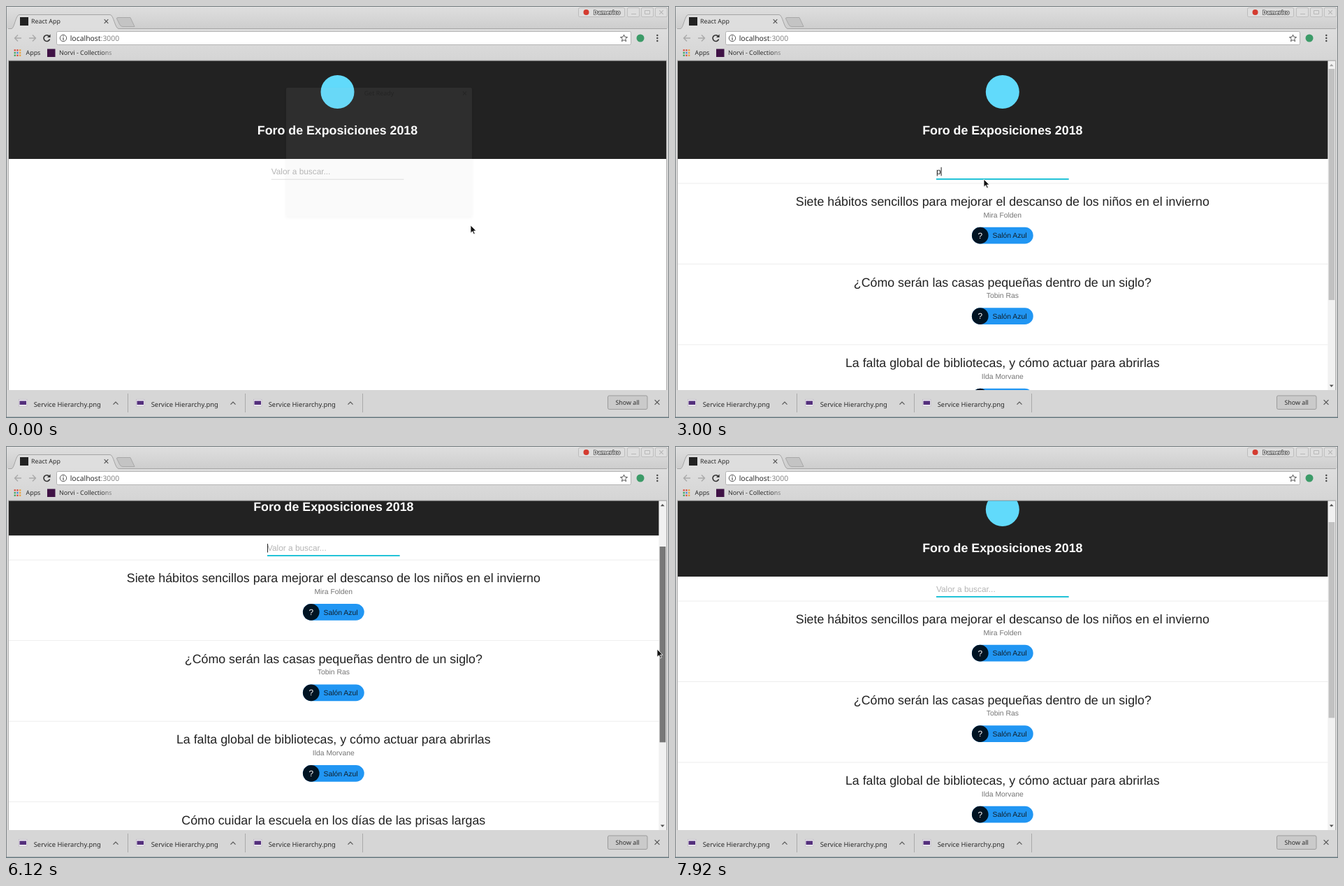
An HTML page for the animation above (8000 ms loop, 949 by 590 pixels).

```html
<!DOCTYPE html>
<html lang="es">
<head>
<meta charset="utf-8">
<title>React App</title>
<style>
  html, body { margin: 0; width: 100%; height: 100%; overflow: hidden; }
  svg { display: block; text-rendering: geometricPrecision; }
  text { font-family: "Noto Sans", sans-serif; font-size: 8.9px; fill: #2c2c2c; }
  .page text { font-family: "Liberation Sans", Arial, sans-serif; font-size: 10.37px; }
  .page .heading { font-size: 17.8px; font-weight: bold; fill: #fff; }
  .page .title { font-size: 17.8px; fill: #212121; }
  .page .author { fill: #757575; }
  .page .field { font-size: 11.85px; }
  .mid { text-anchor: middle; }
  .line { fill: none; stroke: #555; stroke-width: 1.2; }
</style>
</head>
<body>
<svg id="stage" width="949" height="590" viewBox="0 0 949 590"></svg>
<script>
const LOOP = 8000, STEP = 120;
const CENTER = 474.5, ROW_TOP = 254, ROW_HEIGHT = 115.5;
const VIEW_HEIGHT = 471.5, TRACK_TOP = 90, TRACK = 448, DRAG_Y = 237;
const FOCUS_AT = 1320, TYPE_AT = 1960, CLEAR_AT = 3960;

const talks = [
  ["Siete hábitos sencillos para mejorar el descanso de los niños en el invierno", "Mira Folden", "Azul"],
  ["¿Cómo serán las casas pequeñas dentro de un siglo?", "Tobin Ras", "Azul"],
  ["La falta global de bibliotecas, y cómo actuar para abrirlas", "Ilda Morvane", "Azul"],
  ["Cómo cuidar la escuela en los días de las prisas largas", "Florentine Albardoz and Corin Valdersen", "Verde"],
  ["La belleza y la paciencia de los jardines de piedra", "Elsa Trovinger", "Verde"]
];
const rooms = {
  Azul: { fill: "#2196f3", dark: "#001423", width: 87.8 },
  Verde: { fill: "#28a74b", dark: "#001a09", width: 95 }
};

const rect = (x, y, w, h, fill, extra = "") =>
  `<rect x="${x}" y="${y}" width="${w}" height="${h}" fill="${fill}" ${extra}/>`;
const circle = (x, y, r, fill, extra = "") =>
  `<circle cx="${x}" cy="${y}" r="${r}" fill="${fill}" ${extra}/>`;
const path = (d, extra = 'class="line"') => `<path d="${d}" ${extra}/>`;
const text = (x, y, value, extra = "") => `<text x="${x}" y="${y}" ${extra}>${value}</text>`;
const cross = (x, y, r, extra) =>
  path(`M${x - r} ${y - r}l${2 * r} ${2 * r}m0 ${-2 * r}l${-2 * r} ${2 * r}`, extra);

function talkRow([title, author, room], i) {
  const { fill, dark, width } = rooms[room];
  const left = CENTER - width / 2;
  return `<g id="row${i}" transform="translate(0 ${ROW_TOP + i * ROW_HEIGHT})">
    ${rect(0, -.4, 960, .8, "#e9e9e9")}
    ${text(CENTER, 32, title, 'class="title mid"')}
    ${text(CENTER, 48.8, author, 'class="author mid"')}
    ${rect(left, 62.8, width, 23.7, fill, 'rx="11.85"')}
    ${circle(left + 11.85, 74.65, 11.85, dark)}
    ${text(left + 11.85, 78.8, "?", 'class="field mid" style="fill:#fff"')}
    ${text(left + 29.6, 78.4, "Salón " + room, 'style="fill:#10202c"')}
  </g>`;
}

function windowFrame() {
  const buttons = [889.5, 909.5, 929.5].map(x =>
    rect(x, 2.5, 17, 13, "#dedede", 'stroke="#c0c0c0" rx="1.5"')).join("");
  const appColors = ["#dd4b39", "#dd4b39", "#e8a33d", "#3fa65b", "#4285d8", "#e8a33d", "#3fa65b", "#dd4b39", "#e8a33d"];
  const apps = appColors.map((c, i) => rect(11.6 + i % 3 * 3.7, 62.2 + (i / 3 | 0) * 3.7, 2.3, 2.3, c)).join("");
  return `
    ${rect(0, 0, 949, 590, "#d6d6d6")}
    ${rect(0, 0, 949, 32, "url(#bar)")}
    ${rect(0, 0, 949, 1, "#6f787b")}${rect(0, 0, 1, 590, "#7f8588")}
    ${rect(948, 0, 1, 590, "#7f8588")}${rect(0, 588.5, 949, 1.5, "#667980")}
    ${rect(2, 32, 945, 46, "url(#tools)")}
    ${path("M3 32.5H8C12 32 14 12.5 19 12.5H149C154 12.5 156 32 161 32.5H946", 'fill="#dedede" stroke="#a4a4a4"')}
    ${path("M161 16.5H178L184 29.5H167Q164 29.5 162.5 26L158.5 18Q158 16.5 161 16.5Z", 'fill="#c4c4c4" stroke="#a8a8a8"')}
    ${rect(20, 16, 12, 12, "#222")}
    ${text(36, 25.2, "React App")}
    ${cross(143.5, 22, 2.8)}
    ${rect(819.5, 2.5, 66, 13, "#dedede", 'stroke="#bcbcbc" rx="2"')}
    ${circle(830.5, 9, 4, "#d43b30")}
    ${text(841, 12, "Damerico", 'style="font-size:8px;font-weight:600;fill:#eee;stroke:#555;stroke-width:1.6;paint-order:stroke"')}
    ${buttons}
    ${path("M895 11.5H902M914.5 6.5H921.5V11.5H914.5Z", 'fill="none" stroke="#b8b8b8"')}
    ${cross(938, 9, 2.8, 'stroke="#b8b8b8" stroke-width="1.2"')}
    ${path("M22 46H12.5M17 41.5L12.5 46L17 50.5M33 46H42.5M38 41.5L42.5 46L38 50.5", 'fill="none" stroke="#aaa" stroke-width="1.4"')}
    ${path("M62 43.5A4.4 4.4 0 1 0 62.6 47.5", 'fill="none" stroke="#333" stroke-width="1.6"')}
    ${path("M63.6 40.5V45H59Z", 'fill="#333"')}
    ${rect(72.5, 36.5, 822, 19, "#fff", 'stroke="#b3b3b3" rx="2"')}
    ${circle(82, 46, 4.7, "none", 'stroke="#555"')}
    ${path("M82 45V49M82 42.8V44")}
    ${text(91.7, 49.5, 'localhost<tspan fill="#858585">:3000</tspan>', 'style="font-size:10.4px"')}
    ${path("M884.5 41L885.9 44.4L889.5 44.7L886.7 47L887.6 50.6L884.5 48.7L881.4 50.6L882.3 47L879.5 44.7L883.1 44.4Z", 'fill="none" stroke="#555"')}
    ${circle(908, 46, 5.5, "#3c9b68")}
    ${[42, 46, 50].map(y => circle(932.3, y, 1.2, "#444")).join("")}
    ${apps}
    ${text(28.5, 70, "Apps")}
    ${rect(59, 61.5, 11.5, 11.5, "#3f1245")}
    ${text(76, 70, "Norvi - Collections", 'style="fill:url(#fade)"')}
    ${rect(3, 77.5, 943, 472.5, "#b4b4b4")}`;
}

function downloadShelf() {
  const items = [0, 168, 336].map(x => `<g transform="translate(${x} 0)">
    ${rect(18.5, 563.5, 11.5, 9.5, "#f2eef5", 'stroke="#b9b3bf" stroke-width=".6"')}
    ${rect(19.5, 565.5, 9.5, 5.5, "#54307c")}
    ${text(39.7, 573.5, "Service Hierarchy.png", 'style="font-size:9.45px"')}
    ${path("M153.5 570.7L157 567.2L160.5 570.7")}
    ${rect(174, 555, 1, 27, "#aaa")}
  </g>`).join("");
  return `${rect(2, 550, 945, 38, "#d6d6d6")}${items}
    ${rect(861.5, 558, 56.5, 19.5, "#cacaca", 'stroke="#9b9b9b" rx="2"')}
    ${text(889.7, 571, "Show all", 'class="mid"')}
    ${cross(932, 567.5, 3.4)}`;
}

const $ = id => document.getElementById(id);
const set = (id, attrs) => Object.entries(attrs).forEach(([k, v]) => $(id).setAttribute(k, v));
const show = (id, visible) => $(id).setAttribute("visibility", visible ? "visible" : "hidden");

$("stage").innerHTML = `
  <defs>
    <linearGradient id="bar" x2="0" y2="1"><stop stop-color="#dfdfdf"/><stop offset="1" stop-color="#cecece"/></linearGradient>
    <linearGradient id="tools" x2="0" y2="1"><stop stop-color="#dedede"/><stop offset="1" stop-color="#d5d5d5"/></linearGradient>
    <linearGradient id="fade"><stop offset=".8" stop-color="#2c2c2c"/><stop offset="1" stop-color="#2c2c2c" stop-opacity=".4"/></linearGradient>
    <filter id="blur"><feGaussianBlur stdDeviation="2"/></filter>
    <clipPath id="view"><rect x="4" y="78.5" width="941" height="471.5"/></clipPath>
  </defs>
  ${windowFrame()}
  <g class="page" clip-path="url(#view)">
    ${rect(4, 78, 941, 472, "#fff")}
    <g id="content">
      ${rect(0, 78, 960, 141, "#222")}
      ${circle(CENTER, 123, 24, "#61dafb")}
      ${text(CENTER, 183.6, "Foro de Exposiciones 2018", 'class="heading mid"')}
      ${text(379.7, 240.6, "", 'class="field" id="field"')}
      ${rect(379.7, 230.8, 1, 12.5, "#222", 'id="caret"')}
      ${rect(379.7, 247.8, 189.7, .8, "#d8d8d8")}
      ${rect(379.7, 247, 189.7, 1.7, "#00bcd4", 'id="underline"')}
      ${talks.map(talkRow).join("")}
    </g>
    <g id="scrollbar">
      ${rect(934.4, 78, 10.6, 472, "#f1f1f1")}
      ${path("M936.8 86.2L939.7 83L942.6 86.2Z", 'id="arrowUp"')}
      ${path("M936.8 542.6L939.7 545.8L942.6 542.6Z", 'id="arrowDown"')}
      ${rect(935.6, TRACK_TOP, 8.6, 100, "#c1c1c1", 'id="thumb"')}
    </g>
  </g>
  ${downloadShelf()}
  <g id="dialog">
    ${rect(400, 118, 268, 186, "#000", 'rx="3" opacity=".4" filter="url(#blur)"')}
    ${rect(401, 117, 266, 184, "#c8c8c8", 'rx="2"')}
    ${text(534, 128, "Get Ready", 'class="mid"')}
    ${cross(656.5, 125, 2.5)}
  </g>
  ${path("M0 0V11.2L2.7 8.8L4.6 13L6.3 12.2L4.5 8.1H8Z", 'id="cursor" fill="#111" stroke="#fff" stroke-width=".8"')}`;

// [time, x, y] of the pointer tip; x beyond the stage hides it
const pointer = [
  [0, 665, 314], [360, 665, 314], [840, 450, 247], [960, 442, 248], [4320, 442, 248],
  [4920, 852, 249], [5040, 960, 245], [5280, 960, 240], [5520, 936, 237], [5880, 932, 237],
  [6240, 932, 318], [6480, 932, 378], [6720, 932, 398], [6960, 932, 416], [7200, 932, 416],
  [7320, 934, 390], [7800, 938, 290], [7920, 960, 256], [8000, 960, 256]
];

function pointerAt(t) {
  const i = pointer.findIndex(p => p[0] > t);
  const [t0, x0, y0] = pointer[i - 1], [t1, x1, y1] = pointer[i];
  const k = (t - t0) / (t1 - t0);
  return [x0 + (x1 - x0) * k, y0 + (y1 - y0) * k];
}

function rowsAt(t) {
  if (t < 2280) return 0;
  if (t < 2640) return 1;
  return t < CLEAR_AT ? 4 : 5;
}

function draw(t) {
  const [x, y] = pointerAt(t);
  set("cursor", { transform: `translate(${x} ${y})` });
  set("dialog", { opacity: Math.max(0, .072 * (1 - t / 300)) });

  const rows = rowsAt(t);
  talks.forEach((_, i) => show("row" + i, i < rows));
  const height = 176 + rows * ROW_HEIGHT;
  const scrollable = height > VIEW_HEIGHT;
  const thumb = TRACK * Math.min(1, VIEW_HEIGHT / height);
  const offset = t < 5880 ? 0 : Math.max(0, Math.min(TRACK - thumb, y - DRAG_Y));
  const scroll = offset / TRACK * height;
  set("content", { transform: `translate(${scrollable ? -5.7 : 0} ${-scroll})` });

  show("scrollbar", scrollable);
  const hovered = t >= 5520 && t < 5760, dragged = t >= 5760 && t < 7900;
  set("thumb", {
    y: TRACK_TOP + offset, height: thumb,
    fill: dragged ? "#787878" : hovered ? "#a8a8a8" : "#c1c1c1"
  });
  set("arrowUp", { fill: offset > 0 ? "#505050" : "#a3a3a3" });
  set("arrowDown", { fill: offset < TRACK - thumb - .1 ? "#505050" : "#a3a3a3" });

  const typed = t >= TYPE_AT && t < CLEAR_AT;
  $("field").textContent = typed ? "p" : "Valor a buscar...";
  $("field").style.fill = typed ? "#212121" : "#b5b5b5";
  const edited = [CLEAR_AT, TYPE_AT, FOCUS_AT].find(at => t >= at);
  show("caret", edited !== undefined && Math.floor((t - edited) / 500) % 2 === 0);
  set("caret", { x: typed ? 386.3 : 379.7 });

  const focus = Math.max(0, Math.min(1, (t - FOCUS_AT + STEP) / 450));
  const width = 189.7 * (1 - (1 - focus) ** 3);
  set("underline", { x: CENTER - width / 2, width });
}

const start = performance.now();
function tick() {
  const t = (performance.now() - start) % LOOP;
  draw(Math.floor(t / STEP) * STEP);
  requestAnimationFrame(tick);
}
tick();
</script>
</body>
</html>
```
